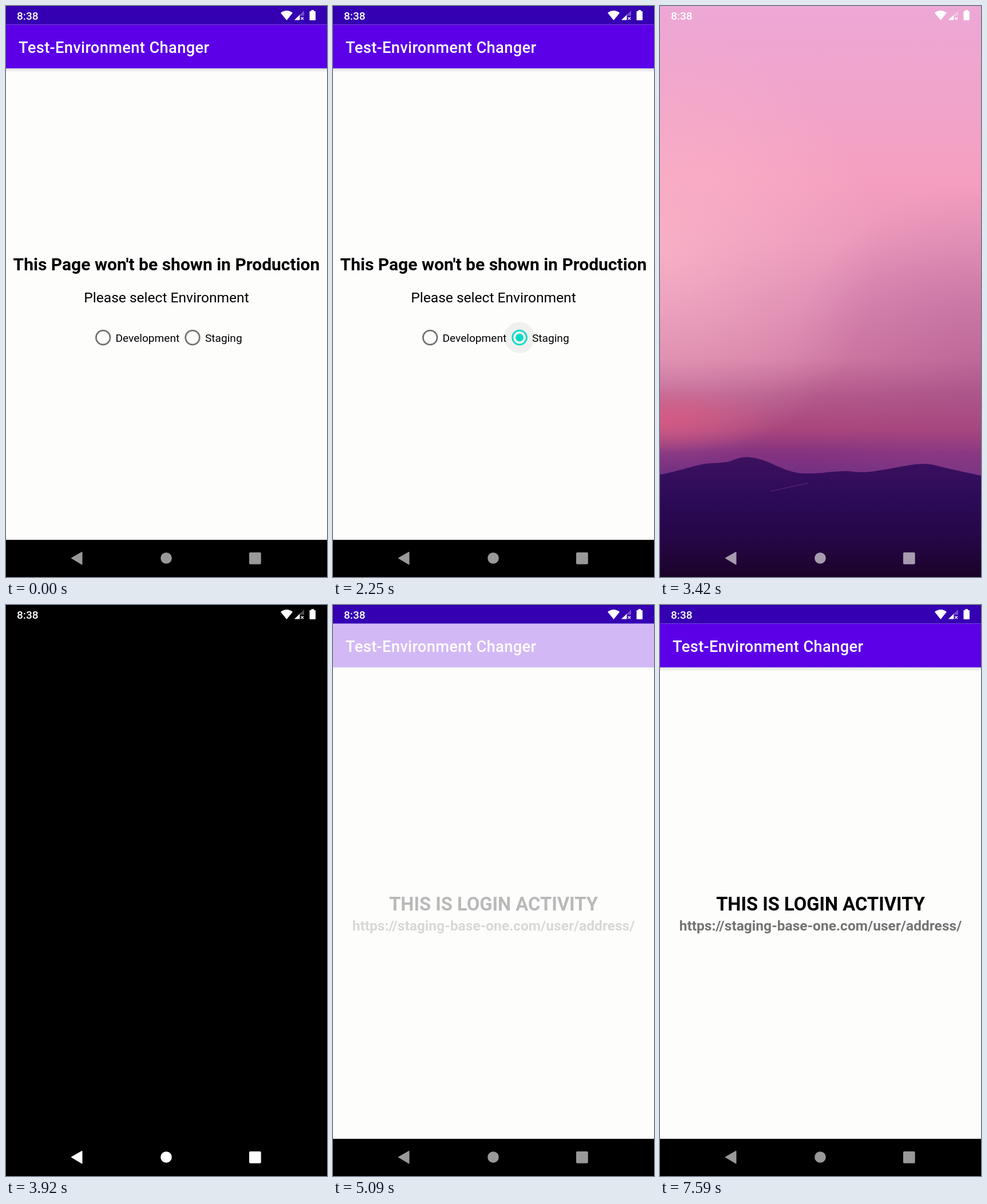
Write an HTML page that moves like this. It is 561 px wide and 998 px high and loops after 7.64 s.

```html
<!DOCTYPE html>
<html lang="en">
<head>
<meta charset="utf-8">
<style>
  html, body { margin: 0; width: 100%; height: 100%; overflow: hidden; background: #000; }
  svg { display: block; width: 561px; height: 998px; font-family: Roboto, sans-serif; }
  .mid { text-anchor: middle; }
  .bold { font-weight: 700; }
  .title { font-size: 27.3px; font-weight: 500; letter-spacing: .0125em; fill: #fff; }
  .ring { fill: none; stroke: #737373; stroke-width: 2.8; }
  .label { font-size: 19.1px; }
</style>
</head>
<body>
<svg viewBox="0 0 561 998">
  <defs>
    <linearGradient id="sky" x2="0" y2="1">
      <stop offset="0" stop-color="#eda8d6"/>
      <stop offset=".18" stop-color="#f0a4cb"/>
      <stop offset=".37" stop-color="#f59fc0"/>
      <stop offset=".5" stop-color="#eb98bb"/>
      <stop offset=".62" stop-color="#dc89b2"/>
      <stop offset=".75" stop-color="#d17ba4"/>
      <stop offset=".83" stop-color="#b35a8b"/>
      <stop offset=".9" stop-color="#a9457c"/>
      <stop offset=".95" stop-color="#853380"/>
      <stop offset="1" stop-color="#713083"/>
    </linearGradient>
    <radialGradient id="glow" gradientUnits="userSpaceOnUse" cx="0" cy="430" r="380">
      <stop offset="0" stop-color="#ffbccb" stop-opacity=".65"/>
      <stop offset="1" stop-color="#ffbccb" stop-opacity="0"/>
    </radialGradient>
    <radialGradient id="dusk" gradientUnits="userSpaceOnUse" cx="561" cy="640" r="330">
      <stop offset="0" stop-color="#a04a88" stop-opacity=".4"/>
      <stop offset="1" stop-color="#a04a88" stop-opacity="0"/>
    </radialGradient>
    <radialGradient id="ember" gradientUnits="userSpaceOnUse" cx="0" cy="722" r="200" gradientTransform="translate(0 505) scale(1 .3)">
      <stop offset="0" stop-color="#dd5a80" stop-opacity=".75"/>
      <stop offset="1" stop-color="#dd5a80" stop-opacity="0"/>
    </radialGradient>
    <linearGradient id="hill" x2="0" y2="1">
      <stop offset="0" stop-color="#3c1160"/>
      <stop offset=".35" stop-color="#2c0a58"/>
      <stop offset=".7" stop-color="#250645"/>
      <stop offset="1" stop-color="#1b0328"/>
    </linearGradient>
    <linearGradient id="shade" x2="0" y2="1">
      <stop offset="0" stop-color="#000" stop-opacity=".13"/>
      <stop offset="1" stop-color="#000" stop-opacity="0"/>
    </linearGradient>
    <g id="bar">
      <rect y="109" width="561" height="7" fill="url(#shade)"/>
      <rect y="32.5" width="561" height="76.5" fill="#5c00e8"/>
      <text class="title" x="22" y="81.5">Test-Environment Changer</text>
    </g>
    <g id="window">
      <rect width="561" height="998"/>
      <rect width="561" height="933" fill="#fdfdfc"/>
      <rect width="561" height="32.5" fill="#3400b2"/>
    </g>
  </defs>

  <g id="picker">
    <use href="#window"/>
    <use href="#bar"/>
    <text class="mid bold" x="280.5" y="462" font-size="30">This Page won't be shown in Production</text>
    <text class="mid" x="280.5" y="518" font-size="24.55">Please select Environment</text>
    <circle id="ripple" cx="326" cy="579.5" fill="#737373"/>
    <circle class="ring" cx="169.7" cy="579.5" r="12.3"/>
    <text class="label" x="191.5" y="587">Development</text>
    <circle class="ring" id="ring" cx="326" cy="579.5" r="12.3"/>
    <circle id="dot" cx="326" cy="579.5" fill="#03dac5"/>
    <text class="label" x="348" y="587">Staging</text>
  </g>

  <g id="home">
    <rect width="561" height="822" fill="url(#sky)"/>
    <rect width="561" height="822" fill="url(#glow)"/>
    <rect width="561" height="822" fill="url(#dusk)"/>
    <rect width="561" height="822" fill="url(#ember)"/>
    <path fill="url(#hill)" d="M0 819C30 814 55 804 80 800C98 798 110 799 122 796C133 792 142 787 158 789C190 791 213 815 250 817C285 818 300 812 330 813C355 817 370 814 400 809C430 804 455 797 478 802C505 809 530 814 561 821V998H0Z"/>
    <path d="M194 848L258 834" stroke="#6b3278" stroke-width="1.5" opacity=".6"/>
  </g>

  <rect id="black" width="561" height="998"/>
  <use id="blank" href="#window"/>

  <g id="login">
    <use href="#bar"/>
    <text class="mid bold" x="280.5" y="534" font-size="32.7">THIS IS LOGIN ACTIVITY</text>
    <text class="mid bold" x="280.5" y="569" font-size="24.55" fill="#737373">https://staging-base-one.com/user/address/</text>
  </g>

  <g fill="#fff">
    <text x="19" y="24" font-size="19.1" font-weight="500">8:38</text>
    <path d="M480 12Q490.500 4 501 12L490.500 25Z"/>
    <path d="M521 8V17H513V24.500H504Z" opacity=".3"/>
    <path d="M513.500 15.500V24.500H504Z"/>
    <path d="M515.500 19.500L520 24M520 19.500L515.500 24" stroke="#fff" stroke-width="1.300"/>
    <path d="M533.500 7H538V9H540Q541 9 541 10V24Q541 25 540 25H531.500Q530.500 25 530.500 24V10Q530.500 9 531.500 9H533.500Z"/>
  </g>
  <g id="nav" fill="#fff" stroke="#fff" stroke-linejoin="round">
    <path d="M115 965L132.500 955V975.500Z" stroke-width="2"/>
    <circle cx="280" cy="965" r="9.800" stroke="none"/>
    <rect x="425" y="955" width="20.700" height="20.700" rx="2" stroke="none"/>
  </g>
</svg>
<script>
  const LOOP = 7640, TAP = 1840, EXIT = 2630;
  const el = id => document.getElementById(id);
  const ramp = (t, a, b) => Math.min(1, Math.max(0, (t - a) / (b - a)));
  const easeOut = x => 1 - (1 - x) ** 2;
  const fade = (id, value) => el(id).setAttribute('opacity', value);

  function draw(t) {
    el('picker').style.display = t < EXIT ? '' : 'none';
    el('home').style.display = t >= EXIT && t < 3700 ? '' : 'none';

    // Radio button: spreading ripple, then the dot grows
    el('ripple').setAttribute('r', 27 * easeOut(ramp(t, TAP, TAP + 225)));
    fade('ripple', .22 * ramp(t, TAP, TAP + 80) * (1 - ramp(t, TAP + 225, 2380)));
    el('ring').style.stroke = t < TAP + 80 ? '#737373' : '#03dac5';
    el('dot').setAttribute('r', 6.8 * easeOut(ramp(t, TAP + 80, TAP + 260)));

    // Relaunch: wallpaper, black, empty window, content
    const dark = ramp(t, 3430, 3640), open = ramp(t, 3960, 4160);
    fade('black', dark);
    fade('blank', open);
    fade('login', ramp(t, 5010, 5320));
    fade('nav', .6 + .4 * dark * (1 - open));
  }

  function tick(now) {
    draw(now % LOOP);
    requestAnimationFrame(tick);
  }
  draw(0);
  requestAnimationFrame(tick);
</script>
</body>
</html>
```
